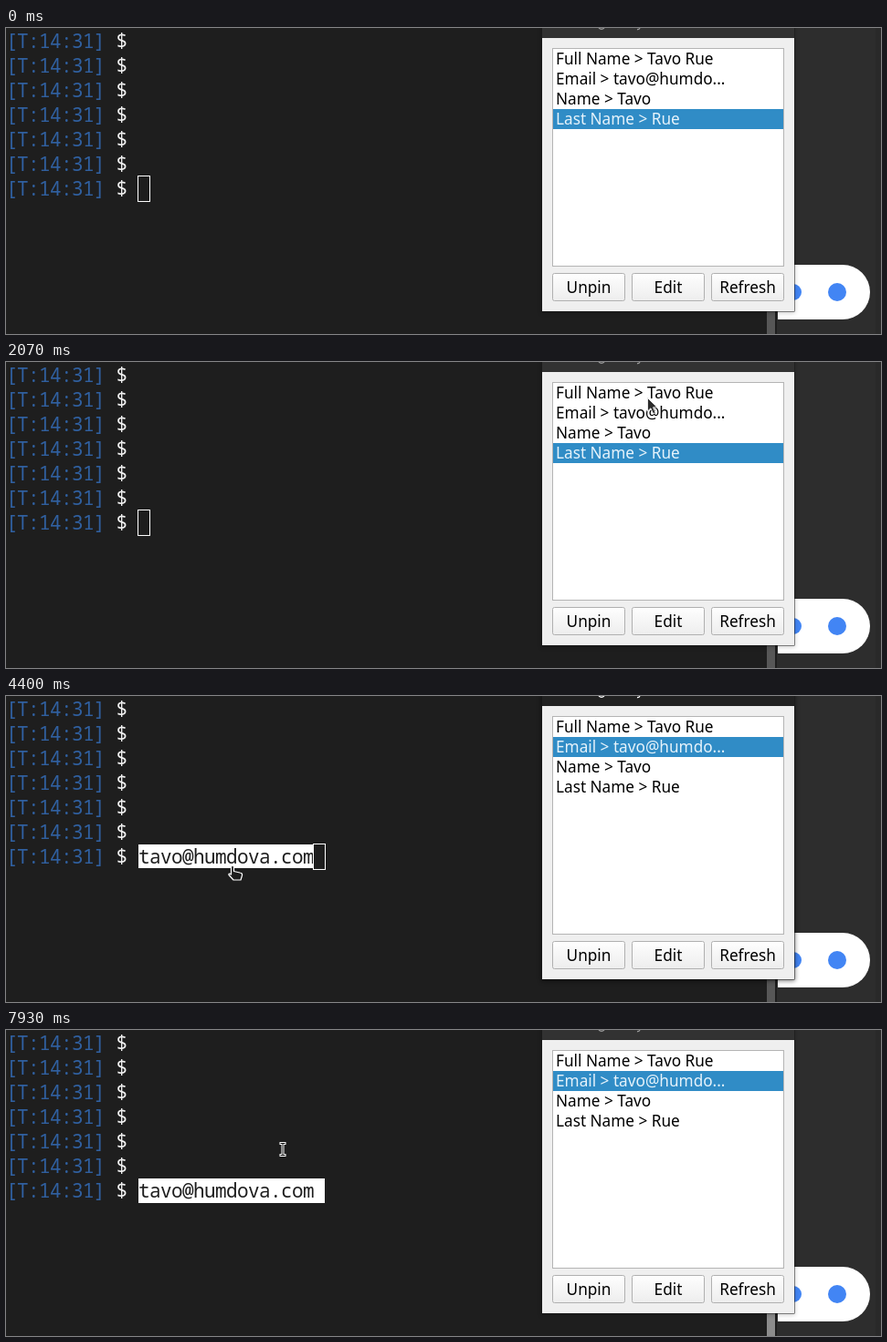
Write an HTML page that moves like this. It is 958x336 px and loops after 8 s.

```html
<!DOCTYPE html>
<html lang="en">
<head>
<meta charset="utf-8">
<title>Drag a snippet into the terminal</title>
<style>
  html, body { margin: 0; width: 100%; height: 100%; overflow: hidden; background: #1e1e1e; }
  svg { display: block; width: 958px; height: 336px; }
  .term { font: 21px "Noto Sans Mono", monospace; letter-spacing: -.6px; }
  .ui { font: 17.2px "Noto Sans", sans-serif; }
</style>
</head>
<body>
<svg viewBox="0 0 958 336">
  <defs>
    <linearGradient id="face" x2="0" y2="1">
      <stop stop-color="#fefefe"/><stop offset="1" stop-color="#ededed"/>
    </linearGradient>
    <filter id="blur" x="-10%" y="-10%" width="120%" height="120%"><feGaussianBlur stdDeviation="2.5"/></filter>
  </defs>

  <rect width="958" height="336" fill="#1e1e1e"/>
  <rect x="844" width="114" height="336" fill="#2d2d2d"/>
  <rect x="952" width="6" height="336" fill="#292929"/>
  <path d="M845 260h71a30 30 0 0 1 0 60h-71z" fill="#fff"/>
  <circle cx="862" cy="290" r="9" fill="#4285f4"/>
  <circle cx="910" cy="290" r="10" fill="#4285f4"/>
  <rect id="scrollbar" x="833" y="300" width="9" height="36"/>

  <g id="prompts" class="term"></g>
  <rect id="highlight" x="145" y="163" fill="#fff"/>
  <text id="typed" class="term" x="145" y="184" fill="#1e1e1e">tavo@humdova.com</text>
  <rect id="caret" y="162.5" width="13" height="28" fill="none" stroke="#fff"/>

  <rect id="shadow" x="586" y="-4" width="278" height="317" fill="#000" filter="url(#blur)"/>
  <rect x="586.5" y="-4" width="277" height="315.5" fill="#1a1a1a"/>
  <rect id="titlebar" x="587" width="276" height="11"/>
  <path id="titleText" d="M649 0q3 2.5 6 0M694 0q-1 2-3 1.5" fill="none" stroke-width="1.3"/>
  <rect x="587" y="11" width="276" height="300" fill="#efefef"/>
  <rect x="598.5" y="22.5" width="253" height="239" fill="#fff" stroke="#b4b4b4"/>
  <rect id="selection" x="599" width="252" height="22" fill="#308cc6"/>
  <g id="rows" class="ui"></g>
  <g id="buttons" class="ui" text-anchor="middle"></g>

  <g id="ibeam" fill="none" stroke-linecap="square">
    <path d="M-2-6.500H2M0-6.500V6.500M-2 6.500H2" stroke="#fff" stroke-width="3"/>
    <path d="M-2-6.500H2M0-6.500V6.500M-2 6.500H2" stroke="#111" stroke-width="1"/>
  </g>
  <path id="arrow" d="M.5.5V15l3.4-3.2 2.7 6 2.5-1.1-2.6-5.9H11z" fill="#2b2b2b" stroke="#e8e8e8"/>
  <g id="drag" stroke="#fff" stroke-width="1.2" fill="#1e1e1e">
    <path d="M-5 4L-8.500 1Q-8-1-5.500-.5L-5-4Q-3-7 0-6.500Q4-7 5.500-4.500Q7.500-1 5.500 3L4 5.500H-3z"/>
    <circle cx="7.500" cy="7" r="5"/>
    <path d="M5 7h5M7.500 4.500v5"/>
  </g>
  <path id="hand" d="M-1.500 8V1.500Q0-1 1.500 1.500V6.500L8 8Q11 8.500 10.500 11L9 16H1L-4 10.500Q-4.500 8-1.500 10z"
        fill="#1e1e1e" stroke="#fff" stroke-width="1.2" stroke-linejoin="round"/>
</svg>
<script>
const LOOP = 8000, TICK = 1000 / 15;
const $ = id => document.getElementById(id);

function set(el, attrs) {
  for (const name in attrs) el.setAttribute(name, attrs[name]);
}
function add(parent, tag, attrs, text = '') {
  const el = document.createElementNS('http://www.w3.org/2000/svg', tag);
  set(el, attrs);
  el.textContent = text;
  $(parent).append(el);
  return el;
}
const show = (id, on) => set($(id), { visibility: on ? 'visible' : 'hidden' });

for (let i = 0; i < 7; i++) {
  const y = 22 + 27 * i;
  add('prompts', 'text', { x: 0, y, fill: '#3060a0' }, '[T:14:31]');
  add('prompts', 'text', { x: 120.5, y, fill: '#f2f2f2' }, '$');
}
const rows = ['Full Name > Tavo Rue', 'Email > tavo@humdo...', 'Name > Tavo', 'Last Name > Rue']
  .map((label, i) => add('rows', 'text', { x: 602, y: 40 + 22 * i }, label));
['Unpin', 'Edit', 'Refresh'].forEach((label, i) => {
  const x = 598.5 + 87 * i;
  add('buttons', 'rect', { x, y: 269.5, width: 79, height: 30, rx: 2, fill: 'url(#face)', stroke: '#b0b0b0' });
  add('buttons', 'text', { x: x + 39.5, y: 291 }, label);
});

// Pointer path: tick, x, y
const path = [
  [2, 217, 4], [6, 322, 66], [10, 490, 157], [14, 573, 150],
  [17, 592, 173], [19, 625, 185], [23, 690, 118], [27, 704, 66],
  [31, 702, 39], [33, 701, 35], [37, 703, 56], [40, 703, 56],
  [44, 640, 84], [48, 430, 158], [52, 261, 185], [53, 252, 187], [55, 248, 187],
  [63, 248, 187], [64, 246, 185], [66, 248, 186], [103, 248, 186], [104, 249, 186],
  [106, 254, 225], [109, 270, 287], [112, 294, 215], [115, 303, 131], [120, 303, 131]
];
// Pointer shape from a given tick on
const shapes = [[0, ''], [2, 'ibeam'], [17, 'arrow'], [42, 'drag'], [59, 'hand'], [105, 'ibeam']];

function pointerAt(tick) {
  const next = path.findIndex(p => p[0] > tick);
  if (next < 1) return path[0].slice(1);
  const a = path[next - 1], b = path[next];
  const f = (tick - a[0]) / (b[0] - a[0]);
  return [1, 2].map(i => Math.round(a[i] + (b[i] - a[i]) * f));
}

function render(time) {
  const tick = Math.floor((time % LOOP + 7) / TICK) % 120;
  const active = tick >= 41 && tick < 118;
  const focused = tick >= 118;
  const dropped = tick >= 58;
  const linked = tick >= 59 && tick < 105;
  const selected = tick < 41 ? 3 : 1;

  const shape = shapes.filter(s => s[0] <= tick).pop()[1];
  const [x, y] = pointerAt(tick);
  for (const id of ['ibeam', 'arrow', 'drag', 'hand']) show(id, id === shape);
  if (shape) set($(shape), { transform: `translate(${x} ${y})` });

  show('typed', dropped);
  show('highlight', dropped);
  set($('highlight'), { width: focused ? 204 : 191, height: linked ? 26 : 27 });
  show('caret', !focused);
  set($('caret'), { x: dropped ? 336.5 : 144.5 });

  set($('selection'), { y: 23 + 22 * selected });
  rows.forEach((row, i) => set(row, { fill: i === selected ? '#e6f3fb' : '#000' }));

  set($('titlebar'), { fill: active ? '#212121' : '#323232' });
  set($('titleText'), { stroke: active ? '#fff' : '#999' });
  set($('shadow'), { opacity: active ? .5 : .2 });
  set($('scrollbar'), { fill: focused ? '#8c8c8c' : '#575757' });
}

const start = performance.now();
function loop() {
  render(performance.now() - start);
  requestAnimationFrame(loop);
}
loop();
</script>
</body>
</html>
```
